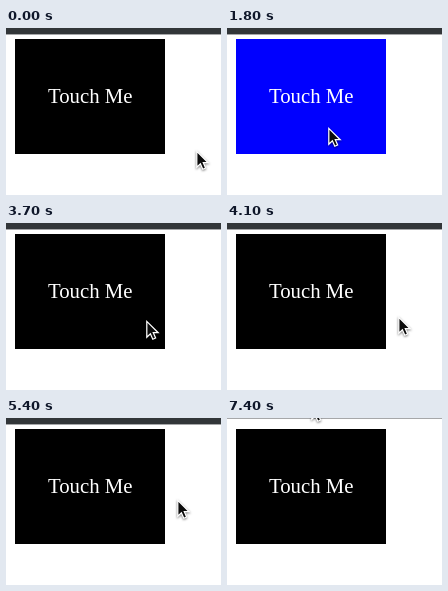
An HTML page that plays this animation: 215x167 px, repeating every 7500 ms.

```html
<!DOCTYPE html>
<html lang="en">
<head>
<meta charset="utf-8">
<title>Touch Me</title>
<style>
  html, body { margin: 0; width: 100%; height: 100%; overflow: hidden; background: #fff; }
  svg { display: block; }
  text { font: 20.8px "Liberation Serif", "Times New Roman", serif; fill: #fff; text-anchor: middle; }
  .bar, .edge, .box, .cursor { animation: 7.5s step-end infinite; }
  .bar { fill: #323639; animation-name: hide; }
  .edge { fill: #a6a7a9; animation-name: lift; }
  .box { fill: #000; animation-name: touch; }
  .cursor { animation-name: move; filter: drop-shadow(0.4px 1.2px 1.1px rgba(0, 0, 0, .5)); }
  .cursor path { fill: #0c0c0c; stroke: #fff; stroke-width: 1.25; }

  @keyframes hide { 0% { opacity: 1; } 98.66%, 100% { opacity: 0; } }
  @keyframes lift { 0% { transform: translateY(6px); } 98.66%, 100% { transform: none; } }

  /* blue while the pointer is over the box; it reacts a moment late */
  @keyframes touch {
    0%, 41.33%, 54.66%, 65.33%, 78.66%, 100% { fill: #000; }
    24%, 50.66%, 61.33%, 73.33% { fill: #00f; }
  }

  @keyframes move {
    0% { transform: translate(190px, 122px); }
    1.33% { transform: translate(186px, 128px); }
    2.66% { transform: translate(182px, 133px); }
    4% { transform: translate(180px, 131px); }
    5.33% { transform: translate(181px, 127px); }
    8% { transform: translate(184px, 123px); }
    9.33% { transform: translate(187px, 120px); }
    24% { transform: translate(101px, 99px); }
    25.33% { transform: translate(92px, 96px); }
    26.66% { transform: translate(90px, 95px); }
    36% { transform: translate(96px, 95px); }
    37.33% { transform: translate(112px, 95px); }
    38.66% { transform: translate(130px, 96px); }
    40% { transform: translate(147px, 96px); }
    41.33% { transform: translate(160px, 97px); }
    42.66% { transform: translate(167px, 97px); }
    44% { transform: translate(170px, 97px); }
    49.33% { transform: translate(140px, 97px); }
    50.66% { transform: translate(126px, 96px); }
    53.33% { transform: translate(146px, 95px); }
    54.66% { transform: translate(171px, 93px); }
    60% { transform: translate(144px, 88px); }
    61.33% { transform: translate(123px, 85px); }
    62.66% { transform: translate(136px, 84px); }
    64% { transform: translate(164px, 82px); }
    65.33% { transform: translate(190px, 81px); }
    66.66% { transform: translate(201px, 81px); }
    68% { transform: translate(192px, 81px); }
    69.33% { transform: translate(177px, 81px); }
    70.66% { transform: translate(174px, 81px); }
    72% { transform: translate(171px, 81px); }
    73.33% { transform: translate(146px, 82px); }
    77.33% { transform: translate(166px, 79px); }
    78.66% { transform: translate(196px, 77px); }
    84% { transform: translate(180px, 62px); }
    85.33% { transform: translate(148px, 38px); }
    86.66% { transform: translate(116px, 17px); }
    88% { transform: translate(96px, 5px); }
    89.33% { transform: translate(89px, 1px); }
    93.33% { transform: translate(87px, -4px); }
    94.66% { transform: translate(85px, -11px); }
    96%, 100% { transform: translate(84px, -16px); }
  }
</style>
</head>
<body>
<svg width="215" height="167" viewBox="0 0 215 167">
  <rect class="bar" width="215" height="6"/>
  <rect class="edge" width="215" height="1"/>
  <rect class="box" x="9" y="11" width="150" height="115"/>
  <text x="84.2" y="75">Touch Me</text>
  <g class="cursor">
    <path d="M.8 1.4V17.2L4.4 13.8L6.8 19.2L9.6 18L7.3 12.7H12.2Z"/>
  </g>
</svg>
</body>
</html>
```
